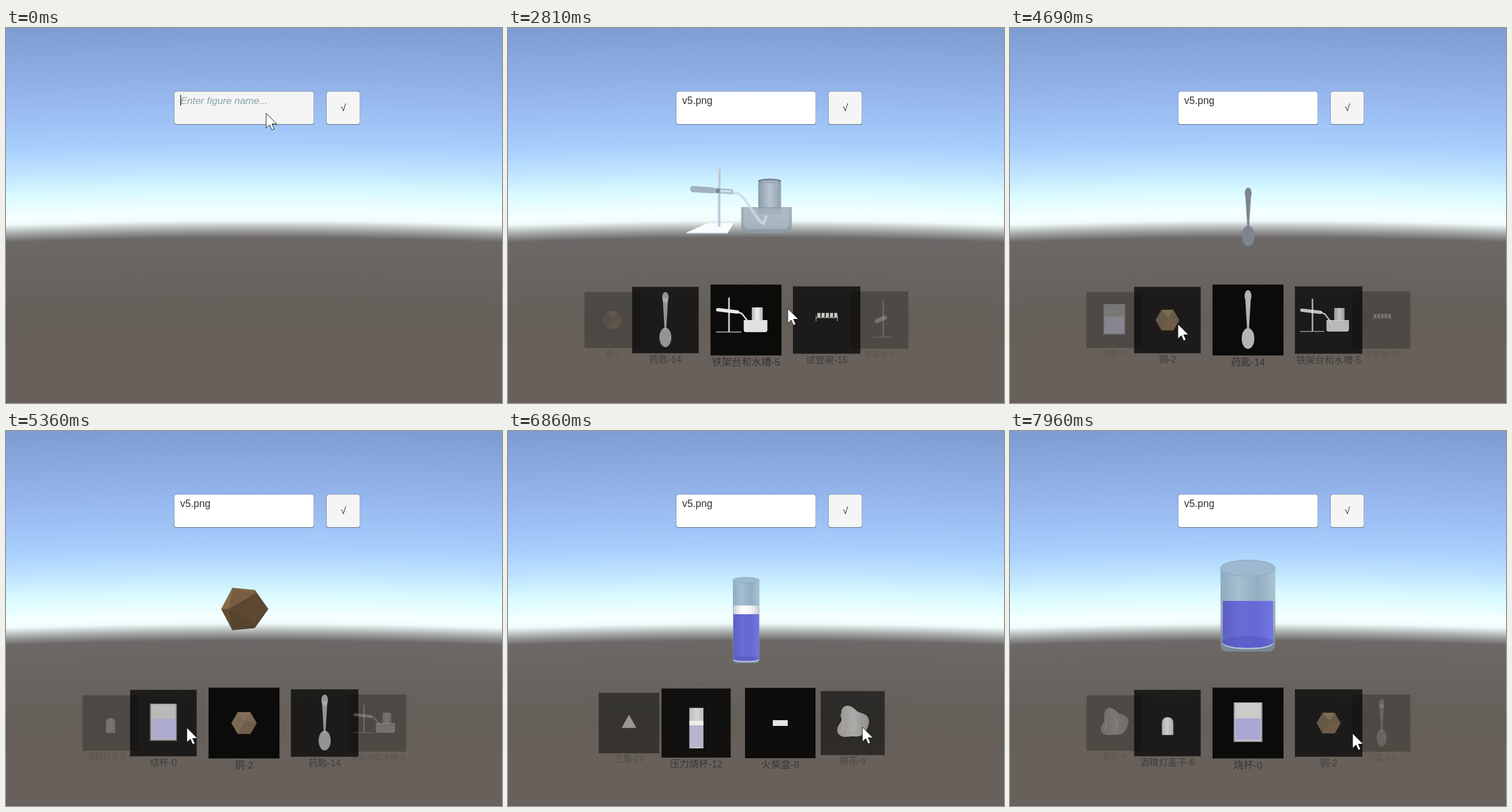
An HTML page with a canvas that plays this animation: 860 by 651 pixels, repeating every 8 s.

```html
<!DOCTYPE html>
<html lang="zh">
<head>
<meta charset="utf-8">
<title>Figure carousel</title>
<style>
  html, body { margin: 0; width: 100%; height: 100%; overflow: hidden; background: #68605a; }
  canvas { display: block; }
</style>
</head>
<body>
<canvas id="stage" width="860" height="651"></canvas>
<script>
const W = 860, H = 651, LOOP = 8000, RAD = Math.PI / 180;
const FONT = '"Liberation Sans", "Noto Sans CJK SC", "Noto Sans CJK", sans-serif';
const g = document.getElementById('stage').getContext('2d');

// ---- drawing helpers ----
const rect = (color, x, y, w, h) => { g.fillStyle = color; g.fillRect(x, y, w, h); };
function trace(pts) {
  g.beginPath();
  for (const [x, y] of pts) g.lineTo(x, y);
}
function poly(color, pts) { trace(pts); g.closePath(); g.fillStyle = color; g.fill(); }
function line(color, width, pts) {
  trace(pts);
  g.strokeStyle = color; g.lineWidth = width; g.lineCap = g.lineJoin = 'round';
  g.stroke();
}
function oval(color, x, y, rx, ry = rx) {
  g.beginPath(); g.ellipse(x, y, rx, ry, 0, 0, 7); g.fillStyle = color; g.fill();
}
function round(color, x, y, w, h, r) {
  g.beginPath(); g.roundRect(x, y, w, h, r); g.fillStyle = color; g.fill();
}
function across(x, w, ...colors) {
  const fade = g.createLinearGradient(x, 0, x + w, 0);
  colors.forEach((c, i) => fade.addColorStop(i / (colors.length - 1), c));
  return fade;
}
function text(str, x, y, font, color, align = 'left') {
  g.font = `${font} ${FONT}`; g.fillStyle = color; g.textAlign = align;
  g.fillText(str, x, y);
}
// Points on a closed curve around the origin, radius given by angle.
const ring = (n, radius) => Array.from({ length: n }, (_, i) => {
  const a = i * 2 * Math.PI / n, r = radius(a);
  return [r * Math.cos(a), r * Math.sin(a)];
});

// ---- sky and ground, bent a little at the horizon ----
const SKY = { 0: '#7e9dd3', 130: '#98baf0', 200: '#a8cdfd', 245: '#bfe4ff', 285: '#daFBff', 322: '#f5ffff',
  334: '#effbfb', 350: '#a3a7a5', 364: '#6c6867', 500: '#645f58', 545: '#68605a' };
const backdrop = document.createElement('canvas');
backdrop.width = W; backdrop.height = H;
{
  const b = backdrop.getContext('2d');
  for (let x = 0; x < W; x += 4) {
    const dip = 8 * (x / 430 - 1) ** 2;
    const fade = b.createLinearGradient(0, dip, 0, H + dip);
    for (const y in SKY) fade.addColorStop(y / H, SKY[y]);
    b.fillStyle = fade;
    b.fillRect(x, 0, 4, H);
  }
}

// ---- turntable projection ----
const DEPTH = 173, PIVOT = 413, HORIZON = 309, SPIN = 90 * RAD / 1150;
const turn = angle => (x, y, z) => {
  const c = Math.cos(angle), s = Math.sin(angle);
  const px = x * c - z * s, pz = x * s + z * c, k = DEPTH / (DEPTH + pz);
  return { at: [PIVOT + px * k, HORIZON + y * k], k, px, pz };
};

function cottonShape() {
  poly(across(-35, 70, '#d0cecc', '#fbf9f7', '#cfcdcb'),
    ring(48, a => 29 + 4 * Math.sin(3 * a + 1) + 3 * Math.cos(4 * a + 2)));
  for (const x of [-20, 4]) line('#bbb9b7', 2, [[x - 3, -16], [x + 3, 2], [x - 2, 16]]);
}
function spoonShape(color) {
  oval(color, 0, -42, 6, 10);
  poly(color, [[-5, -40], [5, -40], [1.5, 18], [-1.5, 18]]);
  oval(color, 0, 32, 11, 18);
}

// ---- big models, drawn for the time in ms ----
function rackModel(t) {
  const p = turn((t - 1400) * SPIN);
  const foot = [[-66, -31], [-19, -47], [67, 50], [19, 74]];
  const [top, under, shelf, shelfLow, low] = [-35, -32, -10, -6, 5.5].map(y => foot.map(([x, z]) => p(x, y, z).at));
  const plate = (a, b) => poly('#5d677a', [top[a], top[b], low[b], low[a]]);
  const ends = [() => plate(2, 3), () => plate(0, 1)];
  if (p(43, 0, 62).pz < p(-42, 0, -39).pz) ends.reverse();
  ends[0]();
  poly('#646b78', shelf);
  poly('#5f6570', under);
  for (const [a, b] of [[1, 2], [3, 0]]) {
    poly('#596376', [top[a], top[b], under[b], under[a]]);
    poly('#656e7c', [shelf[a], shelf[b], shelfLow[b], shelfLow[a]]);
  }
  ends[1]();
}

function apparatusModel(t) {
  const angle = (t - 2810) * SPIN, p = turn(angle);
  const dark = Math.abs(Math.sin(angle));
  const tone = (bright, drop, alpha = 1) => {
    const v = bright - drop * dark;
    return `rgba(${v},${v + 14},${v + 27},${alpha})`;
  };
  const base = y => [[-81, -40], [-25, -40], [-25, 36], [-81, 36]].map(([x, z]) => p(x, y, z).at);
  poly('#9db0c4', base(37.5));
  poly('#fbfcfd', base(36));

  const stand = () => {
    const top = p(-50, -67, 9), foot = p(-50, 36, 9), clamp = p(-50, -27, 3);
    const back = p(-91, -29, -2), neck = p(-27, -25, 0);
    line(tone(205, 85), 5 * top.k, [top.at, foot.at]);
    line(tone(140, 30), top.k, [top, foot].map(({ at: [x, y], k }) => [x + 2 * k, y]));
    line(tone(150, 45, .85), 10.5 * back.k, [back.at, [(back.at[0] + neck.at[0]) / 2, (back.at[1] + neck.at[1]) / 2]]);
    line(tone(165, 60, .85), 9 * neck.k, [back.at, neck.at]);
    line(tone(215, 90), 3 * neck.k, [clamp.at, neck.at]);
    oval(tone(120, 30), ...clamp.at, 4 * clamp.k);
  };
  const vessels = () => {
    const { at: [cx], k: ck } = p(39, 0, -7), { at: [vx], k } = p(36, 0, 4);
    const r = 19 * ck, top = HORIZON - 42 * ck, w = 90 * k, y = HORIZON + 2 * k;
    rect(across(cx - r, 2 * r, tone(140, 25), tone(183, 50), tone(145, 25)), cx - r, top, 2 * r, 55 * ck);
    oval(tone(115, 10), cx, top, r, 3.5 * ck);
    oval(tone(163, 40), cx, top + 1, r * .8, 2 * ck);
    round(tone(140, 25, .78), vx - w / 2, y, w, 46 * k, [0, 0, 11, 11]);
    round(tone(185, 40, .42), vx - w / 2 + 5, y + 2, w - 10, 37 * k, [0, 0, 8, 8]);
    const pipe = [[-27, -23], [-14, -22], [-6, -16], [24, 27], [30, 31], [35, 18]];
    line(tone(205, 70, .85), 4.5, pipe.map(([x, h]) => p(x, h, 0).at));
  };
  const parts = [stand, vessels];
  if (p(-50, 0, 0).pz < p(37, 0, 0).pz) parts.reverse();
  parts.forEach(draw => draw());
}

function spoonModel(t) {
  g.save();
  g.translate(PIVOT, 329);
  g.scale(.4 + .6 * Math.abs(Math.cos(t * SPIN)), 1);
  spoonShape('#7d858f');
  g.restore();
}

// Icosahedron: corners from the golden ratio, faces from triples of neighbours.
const PHI = (1 + Math.sqrt(5)) / 2;
const corners = [-1, 1].flatMap(a => [-PHI, PHI].flatMap(b => [[0, a, b], [a, b, 0], [b, 0, a]]));
const near = (a, b) => Math.hypot(...a.map((v, i) => v - b[i])) < 2.1;
const faces = corners.flatMap((a, i) => corners.slice(i + 1).flatMap((b, j) =>
  corners.slice(i + j + 2).filter(c => near(a, b) && near(b, c) && near(a, c)).map(c => [a, b, c])));

function copperModel(t) {
  const p = turn(25.8 * RAD + (t - 5360) * SPIN);
  faces.map(face => {
    const [x, y, z] = [0, 1, 2].map(i => face.reduce((sum, v) => sum + v[i], 0) / 3);
    return { face, y, mid: p(x, y, z) };
  }).sort((a, b) => b.mid.pz - a.mid.pz).forEach(({ face, y, mid }) => {
    const b = 92 + 45 * Math.max(0, -.6 * mid.px - .7 * y + .3 * mid.pz) - 6 * y;
    poly(`rgb(${b},${b * .78},${b * .53})`, face.map(v => p(...v.map(n => n * 21.5)).at));
  });
}

function beakerModel(x, y, w, h, ry, level, inset) {
  const cx = x + w / 2, bottom = y + h - ry, lx = x + inset, lw = w - 2 * inset;
  round('rgba(125,148,168,.75)', x, y + ry, w, h - ry, [0, 0, w / 8, w / 8]);
  rect(across(x, w, '#8fabc0', '#a5c0d1', '#93aec1', '#a9c3d2'), x, y + ry, w, level - y - ry);
  oval('#9db9cf', cx, y + ry, w / 2, ry);
  g.strokeStyle = '#8aa6bc'; g.lineWidth = 1; g.stroke();
  const bowl = (color, low) => {
    g.beginPath();
    g.moveTo(lx, level); g.lineTo(lx + lw, level);
    g.ellipse(cx, low, lw / 2, ry * .7, 0, 0, Math.PI);
    g.fillStyle = color; g.fill();
  };
  bowl('#b9c8da', bottom);
  bowl(across(lx, lw, '#5d5fc4', '#696bd6', '#6668d4', '#7375e2'), bottom - 2);
  oval('rgba(82,84,190,.5)', cx, bottom - 3, lw / 2, ry * .7);
}

function pressureModel() {
  beakerModel(390, 254, 46, 149, 5, 318, 1);
  rect(across(390, 46, '#c9cbd0', '#fff', '#f4f5f6', '#c6cacc'), 391, 303, 44, 15);
}

function capModel() {
  round(across(385, 56, '#8b9096', '#d3d6d9', '#9a9fa5'), 385, 264, 56, 88, [28, 28, 3, 3]);
}

function cottonModel(t) {
  g.save();
  g.translate(422, 310);
  g.scale(1.9, 1.9);
  g.rotate(Math.sin(t * SPIN) * .15);
  cottonShape();
  g.restore();
}

// ---- carousel items: label, thumbnail, big model ----
const LIGHT = '#e8e8e7';
function standIcon(x, top, bottom, left, right) {
  rect('#c8c8c8', x, top, 3, bottom - top);
  rect('#c0c0c0', left, bottom, right - left, 1.5);
}
const items = [
  ['三角-17', () => poly('#fbf9f6', [[0, -17], [15, 10], [-15, 10]])],
  ['压力烧杯-12', () => {
    rect(across(-12, 25, '#c9c9c9', '#e3e3e3', '#cfcfcf'), -12, -27, 25, 72);
    rect('#f0f0f0', -12, -4, 25, 8);
    rect('#b5b3cf', -11, 4, 23, 39);
  }, pressureModel],
  ['火柴盒-8', () => rect('#efefef', -13, -5, 26, 10)],
  ['棉花-9', cottonShape, cottonModel],
  ['酒精灯盖子-6', () => round(across(-10, 20, '#d5d5d5', '#f6f6f6', '#d0d0d0'), -10, -11, 21, 33, [10, 10, 1, 1]), capModel],
  ['烧杯-0', () => {
    rect('#8d8d90', -25, -36, 50, 69);
    rect('#cbcbc9', -23, -35, 46, 66);
    rect('#aaa8d3', -22, -8, 44, 37);
  }, () => beakerModel(365, 224, 95, 159, 14, 295, 4)],
  ['铜-2', () => {
    const hexagon = ring(6, () => 22);
    poly('#7a6854', hexagon);
    poly('#84705a', [hexagon[4], hexagon[5], [2, -4]]);
    poly('#705e4a', [hexagon[0], hexagon[1], hexagon[2], [2, -4]]);
  }, copperModel],
  ['药匙-14', () => spoonShape('#b4b3b1'), spoonModel],
  ['铁架台和水槽-5', () => {
    standIcon(-31, -39, 20, -52, -8);
    line(LIGHT, 6, [[-49, -18], [-15, -14]]);
    line(LIGHT, 2.5, [[-14, -14], [-7, -11], [3, 2]]);
    rect(across(10, 19, '#b5b5b5', '#ededed', '#b5b5b5'), 10, -22, 19, 23);
    round('#e3e0e4', -4, 0, 41, 21, [0, 0, 4, 4]);
  }, apparatusModel],
  ['试管架-15', () => {
    for (let i = 0; i < 5; i++) rect('#f4f4ee', -17 + i * 7.7, -13, 5.6, 8);
    rect('#b5b5b0', -19, -5, 39, 1.5);
    for (const x of [-20, 19]) rect('#aaa', x, -8, 1.5, 10);
  }, rackModel],
  ['铁架台-4', () => {
    standIcon(6, -43, 36, -15, 28);
    line(LIGHT, 9, [[-6, 2], [11, -5]]);
  }],
  ['导管-10', () => line('#d0d0d0', 4, [[-55, -47], [-40, -45], [16, 25], [22, 22], [26, 10]])]
];

// ---- timeline ----
const PRESS = 800, MOVE = 340, TRAVEL = 420;
const smooth = p => { p = Math.min(1, Math.max(0, p)); return p * p * (3 - 2 * p); };
const slot = d => {
  const a = d * 34 * RAD, c = Math.cos(a);
  return { x: 412.7 + 250 * Math.sin(a), size: 83 + 40 * c + 1.5 * Math.sin(a), alpha: (c - .15) / .85 };
};

// Each turn starts at a time and shifts the carousel by a number of cards.
let centre = 9;
const turns = [[1740, -1], [4040, -1], [4800, -1], [5570, -2], [5920, -1], [6330, -2], [6738, 2], [7400, 2]]
  .map(([start, by]) => ({ start, by, from: centre, to: centre += by }));
const presses = [PRESS, ...turns.map(s => s.start - 100)];

// Cursor stops: [arrival, x, y]; presses land towards the inner half of their card.
const stops = [[0, 451, 148], [PRESS - 40, 585, 140], [1300, 450, 515], [2600, 485, 487], [5250, 404, 516], [7900, 594, 525],
  ...turns.map(({ start, by }) => [start - 110, PIVOT + .87 * (slot(by).x - PIVOT), 514])].sort((a, b) => a[0] - b[0]);

function carouselAt(t) {
  const s = turns.findLast(s => t >= s.start);
  if (!s) return { pos: 9, shown: 9 };
  const p = (t - s.start) / MOVE;
  return { pos: s.from + s.by * smooth(p), shown: p < 1 ? s.from : s.to };
}

function cursorAt(t) {
  const i = stops.findIndex(s => s[0] > t);
  if (i < 0) return stops.at(-1).slice(1);
  const [t0, x0, y0] = stops[i - 1], [t1, x1, y1] = stops[i];
  const leave = Math.max(t0 + 20, t1 - TRAVEL), p = smooth((t - leave) / (t1 - leave));
  return [x0 + (x1 - x0) * p, y0 + (y1 - y0) * p];
}

function drawCarousel(pos) {
  for (let k = Math.floor(pos) - 2; k <= pos + 3; k++) {
    const { x, size, alpha } = slot(k - pos);
    if (alpha <= 0) continue;
    const [label, thumb] = items[(k + items.length) % items.length];
    g.save();
    g.globalAlpha = alpha;
    g.translate(x, 507);
    g.scale(size / 123, size / 123);
    rect('#0b0b0a', -61.5, -61.5, 123, 123);
    thumb();
    g.textBaseline = 'middle';
    text(label, 0, 74, '17.2px', 'rgba(46,46,46,.85)', 'center');
    g.restore();
  }
}

function drawForm(t) {
  const typed = 'v5.png'.slice(0, Math.max(0, Math.floor((t + 35) / 55)));
  const focused = t < PRESS + 40, held = t >= PRESS && t < presses[1];
  const box = (color, x, w) => {
    round('rgba(70,80,95,.75)', x - .5, 109.7, w + 1, 58.3, 4);
    round(color, x, 110.3, w, 56.7, 4);
  };
  box(focused ? '#f4f4f4' : '#fff', 292, 241.5);
  box(held ? '#ebebeb' : '#f5f5f5', 556, 57.5);
  g.textBaseline = 'alphabetic';
  if (typed) text(typed, 302, 132, '17.5px', '#323232');
  else text('Enter figure name...', 302.5, 132, 'italic 17.2px', '#86a3a6');
  if (focused) rect('#323232', 302 + (typed ? g.measureText(typed).width : 0), 116, 1.4, 19);
  text('√', 585, 144, '17px', '#323232', 'center');
}

function drawCursor(t) {
  const [x, y] = cursorAt(t);
  if (presses.some(c => t >= c && t < c + 130)) oval('rgba(255,240,0,.5)', x, y, 18);
  const arrow = [[0, 0], [0, 25.5], [6, 20], [10, 29], [14, 27.3], [10, 18.6], [18.5, 18.6], [0, 0]].map(([a, b]) => [x + a, y + b]);
  poly('#fff', arrow);
  line('#222', 1, arrow);
}

function draw(t) {
  g.drawImage(backdrop, 0, 0);
  drawForm(t);
  if (t >= PRESS + 80) {
    const { pos, shown } = carouselAt(t);
    items[shown][2](t);
    drawCarousel(pos);
  }
  drawCursor(t);
}

const begin = performance.now();
function tick() {
  draw((performance.now() - begin) % LOOP);
  requestAnimationFrame(tick);
}
tick();
</script>
</body>
</html>
```
